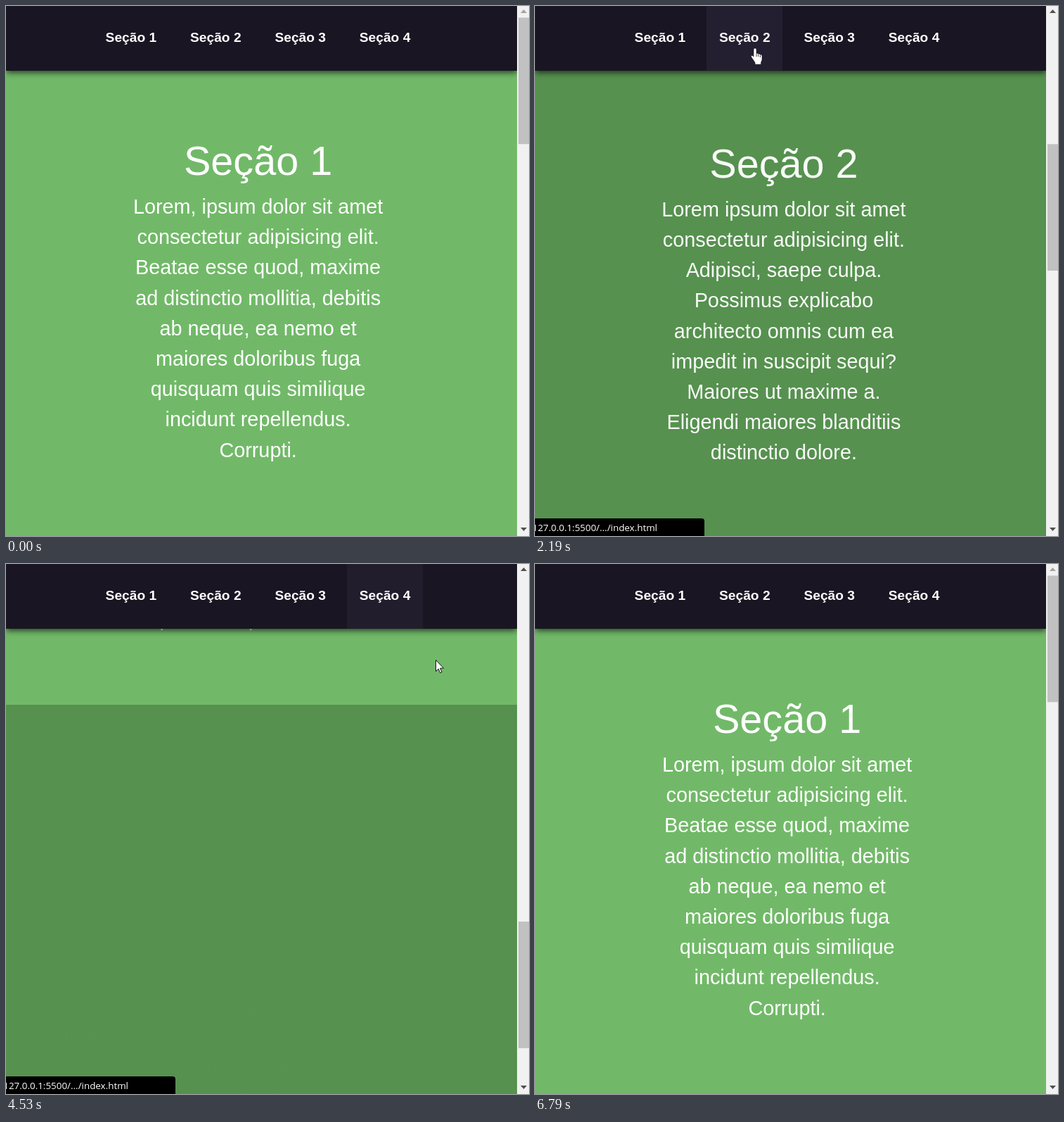
An HTML page for the animation above (7170 ms loop, 744 by 753 pixels).

```html
<!DOCTYPE html>
<html lang="pt-BR">
<head>
<meta charset="utf-8">
<style>
html, body { margin: 0; height: 100%; overflow: hidden; background: #f1f1f1; }
#view, #over { position: absolute; left: 0; top: 0; height: 753px; overflow: hidden; }
#view { width: 727px; background: #71b968; }
#over { width: 744px; }
section { position: absolute; width: 727px; height: 753px; background: #71b968; }
section:nth-child(even) { background: #56914f; }
section svg { position: absolute; overflow: visible; }
.copy { font: 28.8px "Liberation Sans", Arial, sans-serif; fill: #fff; text-anchor: middle; }
.copy .title { font-size: 57.6px; }
nav { position: absolute; width: 727px; height: 92px; background: #1a1522; box-shadow: 0 2px 9px rgba(0, 0, 0, .75); }
nav div { position: absolute; top: 0; width: 108.4px; height: 92px; text-align: center;
  font: bold 19.2px/90px "Liberation Sans", Arial, sans-serif; color: #fff; }
#status text { font: 13.4px "Open Sans", "Noto Sans", sans-serif; fill: #fff; text-anchor: end; }
</style>
</head>
<body>
<div id="view"><div id="page"></div><nav id="nav"></nav></div>
<svg id="over" width="744" height="753">
  <g id="status">
    <path d="M0 728H237q4 0 4 4V753H0Z"/>
    <text x="174" y="746">127.0.0.1:5500/.../index.html</text>
  </g>
  <path id="up" d="M732 10h9l-4.5-5Z"/>
  <path d="M732 741h9l-4.5 5Z" fill="#505050"/>
  <rect id="thumb" x="729" width="15" height="179.75" fill="#c1c1c1"/>
  <g id="cursor">
    <path id="arrow" d="M.5.5V16.5L4.2 13L6.6 18.6L9 17.6L6.6 12.1H11.5Z" fill="#fff" stroke="#111"/>
    <g id="hand" transform="translate(-6)">
      <path d="M6 0C7 0 8 .8 8 2V7.5l1.5-.3 1.2 1 1.6-.2 1 1.1 1.2.1c1 .2 1.5 1 1.5 2V16c0 1-1 3-1.5 4v3H6v-2.5C4 17 1.5 14 .5 12c-.5-1.5 1-2.3 2.2-1.3L4 12V2C4 .8 5 0 6 0Z" fill="#fff" stroke="#111" stroke-width=".6"/>
      <path d="M8 8v4M10.7 9v3M13.4 10v3" stroke="#111" stroke-width=".8"/>
    </g>
    <path id="beam" d="M-3.5-7.5H-1L0-7L1-7.5H3.5M0-7V7M-3.5 7.5H-1L0 7L1 7.5H3.5" fill="none" stroke="#666"/>
  </g>
</svg>
<script>
const LOOP = 7170, VH = 753, TAB = 120.4, TAB_X = 123.7;
const $ = id => document.getElementById(id);

const copy = [
  'Lorem, ipsum dolor sit amet|consectetur adipisicing elit.|Beatae esse quod, maxime|ad distinctio mollitia, debitis|ab neque, ea nemo et|maiores doloribus fuga|quisquam quis similique|incidunt repellendus.|Corrupti.',
  'Lorem ipsum dolor sit amet|consectetur adipisicing elit.|Adipisci, saepe culpa.|Possimus explicabo|architecto omnis cum ea|impedit in suscipit sequi?|Maiores ut maxime a.|Eligendi maiores blanditiis|distinctio dolore.',
  'Lorem, ipsum dolor sit amet|consectetur adipisicing elit.|Assumenda mollitia, voluptas|nam ab consequuntur|suscipit aperiam minima,|molestias laudantium dolores|cum error perspiciatis illo|esse quos sequi consequatur|placeat reprehenderit!',
  'Lorem, ipsum dolor sit amet|consectetur adipisicing elit.|Illum corrupti sint quod nisi|possimus recusandae? Optio|dolorem fugiat numquam|eveniet natus ratione|voluptate quia tempore|laborum veniam quaerat|deserunt.'
];
const line = (text, y, cls = '') => `<text class="${cls}" x="358.6" y="${y}">${text}</text>`;
$('page').innerHTML = copy.map((text, i) =>
  `<section style="top:${i * VH}px"><svg class="copy" width="727" height="753">` +
  line('Seção ' + (i + 1), 240, 'title') +
  text.split('|').map((s, k) => line(s, 295 + 43.2 * k)).join('') + '</svg></section>').join('');
$('nav').innerHTML = copy.map((_, i) =>
  `<div style="left:${TAB_X + TAB * i}px">Seção ${i + 1}</div>`).join('');
const texts = document.querySelectorAll('.copy');
const tabs = document.querySelectorAll('nav div');

const clamp = v => Math.min(1, Math.max(0, v));
const bezier = (x1, y1, x2, y2) => x => {
  x = clamp(x);
  const at = (a, b, s) => 3 * a * s * (1 - s) ** 2 + 3 * b * s * s * (1 - s) + s ** 3;
  let lo = 0, hi = 1;
  for (let i = 0; i < 24; i++) {
    const mid = (lo + hi) / 2;
    if (at(x1, x2, mid) < x) lo = mid; else hi = mid;
  }
  return at(y1, y2, lo);
};
const ease = bezier(.25, .1, .25, 1), easeInOut = bezier(.42, 0, .58, 1);
// goes 0 -> 1 at "on" and back at "off"
const toggle = (t, on, off, ms) => ease((t - on) / ms) - ease((t - off) / ms);

const clicks = [1638, 2933, 4237], back = 5674;
const path = [ // time, x, y of the pointer's hot spot
  [430, 688, 708], [640, 410, 307], [930, 160, 50], [1080, 280, 50], [2190, 313, 60],
  [2600, 420, 37], [2860, 420, 37], [3340, 463, 69], [4020, 572, 46], [4490, 574, 50],
  [4530, 611, 136], [5200, 672, 320], [5600, 593, 466], [6400, 593, 466], [6770, 688, 708]
];
const [start, end] = [path[0][0], path.at(-1)[0]];

function pointer(t) {
  const i = Math.max(1, path.findIndex(p => p[0] > t));
  const [[t0, x0, y0], [t1, x1, y1]] = [path[i - 1], path[i]];
  const k = clamp((t - t0) / (t1 - t0));
  return [x0 + (x1 - x0) * k, y0 + (y1 - y0) * k];
}
function tabAt([x, y]) {
  const pos = (x - TAB_X) / TAB;
  return y < 92 && pos >= 0 && pos % 1 < .9 ? Math.floor(pos) : -1;
}
// share of the last 200 ms spent over a tab: a linear fade in and out
function glow(t, tab) {
  let hits = 0;
  for (let ago = 0; ago < 200; ago += 10) hits += tabAt(pointer(t - ago)) === tab;
  return hits / 20;
}
const show = (el, on) => { el.style.display = on ? '' : 'none'; };

function draw(t) {
  const forward = clicks.reduce((sum, at) => sum + easeInOut((t - at) / 457), 0);
  const scroll = VH * (forward - 3 * easeInOut((t - back) / 780));
  $('page').style.transform = `translateY(${-Math.round(scroll)}px)`;
  $('thumb').setAttribute('y', 16.5 + scroll * 719 / (4 * VH));
  $('up').setAttribute('fill', scroll < 1 ? '#a3a3a3' : '#505050');

  texts.forEach((el, i) => {
    const p = i ? toggle(t, clicks[i - 1] + 290, back + 741 - 178 * i, 350) : 1;
    el.style.opacity = p;
    el.style.transform = p < 1 ? `translate(${-120 * (1 - p)}px, ${100 * (1 - p)}px)` : '';
  });
  tabs.forEach((el, i) => { el.style.background = `rgba(35, 31, 48, ${glow(t, i)})`; });
  $('status').style.opacity = toggle(t, 1230, 6480, 150);

  const [x, y] = pointer(t);
  const hand = tabAt([x, y]) >= 0;
  const beam = scroll < 1 && x > 180 && x < 537 && y > 190 && y < 650;
  show($('cursor'), t >= start && t < end);
  show($('hand'), hand);
  show($('beam'), beam);
  show($('arrow'), !hand && !beam);
  $('cursor').setAttribute('transform', `translate(${Math.round(x)} ${Math.round(y)})`);
}

function tick() {
  draw(performance.now() % LOOP);
  requestAnimationFrame(tick);
}
tick();
</script>
</body>
</html>
```
